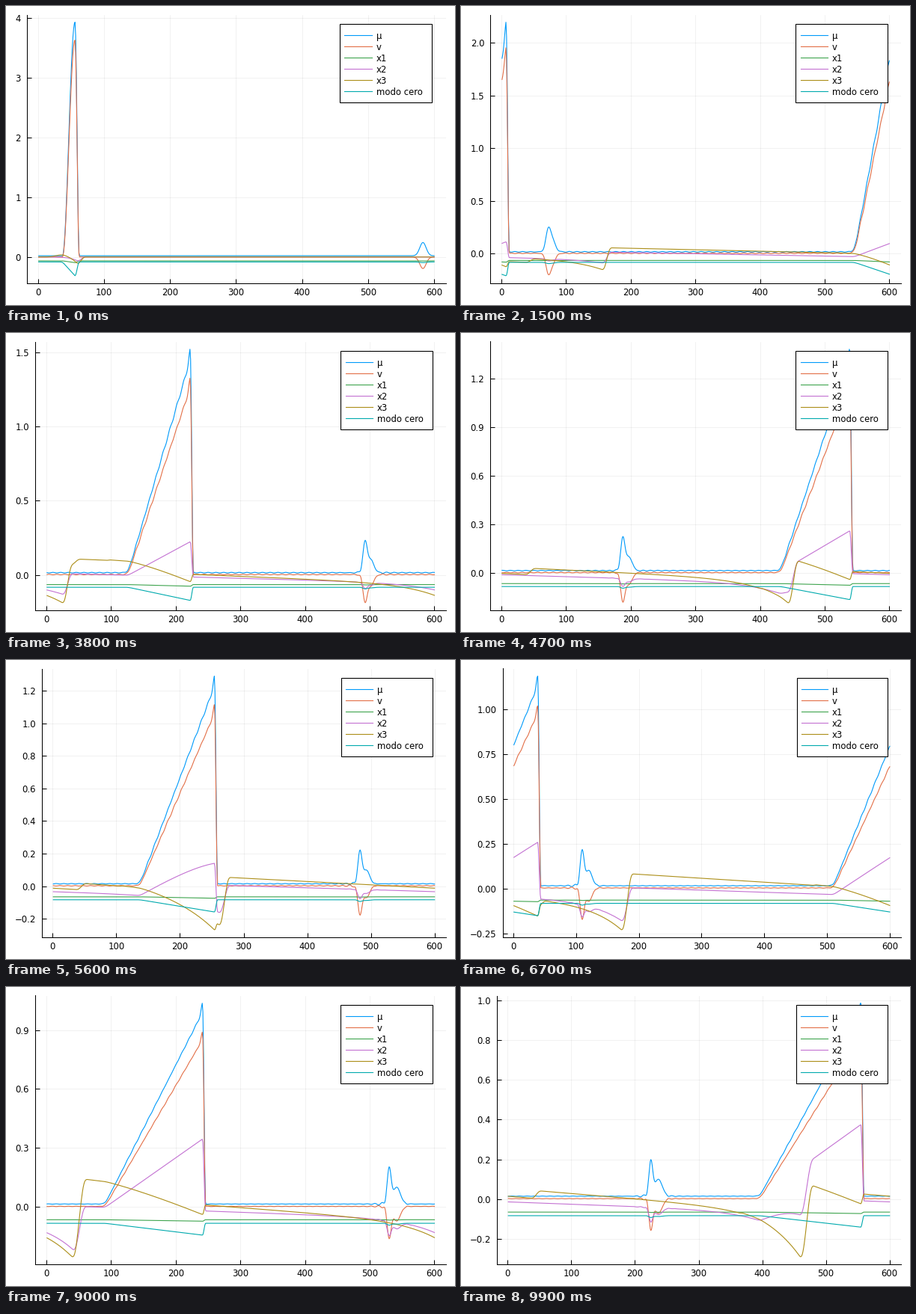
These frames come from a looping animation (600 px wide and 400 px high, 10 s). A matplotlib script:

```python
import numpy as np
import matplotlib
import matplotlib.pyplot as plt
from matplotlib.animation import FuncAnimation
from matplotlib.lines import Line2D
from matplotlib.patches import Rectangle
from matplotlib.transforms import Affine2D

W, H, N, L = 600, 400, 100, 600
TOP, BOTTOM, RIGHT = 11.5, 371, 588
FONT_PT = 11.6 * 0.72
matplotlib.rcParams["font.family"] = "DejaVu Sans"

NAMES = ["μ", "v", "x1", "x2", "x3", "modo cero"]
COLORS = ["#009afa", "#e36f47", "#3ea44e", "#c371d2", "#ac8e18", "#00aaae"]

x = np.arange(1, L + 1)


def smooth(y):
    return sum(np.roll(y, k) for k in range(-2, 3)) / 5


def ease(t):
    return (1 - np.cos(np.pi * np.clip(t, 0, 1))) / 2


def ramp(n):
    """Widening triangular pulse: full shape, plain shape, and the lag it leaves."""
    w = np.sqrt(361 + (222 + 0.29 * n) * n)
    s = (x - 37 - 33.93 * n + 30) % L - 30
    z = s - w
    young = np.exp(-n / 3)
    k = 2 - young
    line = np.minimum(k * np.log1p(np.exp(s / k)) / w, 1)
    t = np.clip(s / w, 0, 1)
    fall = 1 - ease(z / (5 + 1.5 * young))

    lead = 0.045 * (1 - young)
    rise = line + young * (ease(t) - line)
    ripple = 0.008 * np.exp(-n / 60) * (1 - young) * (1 + np.exp(z / 12))
    ripple = ripple * np.cos(2 * np.pi * z / 10.5) * np.clip(8 * t, 0, 1)
    full = (1 - lead) * rise + lead * np.exp(-((z / 3) ** 2)) + ripple
    lag = np.where(z > 0, 1 - z / (L - w), t**1.5)
    return np.where(z > 0, fall, full), line * fall, np.clip(lag, 0, 1)


def bump(n):
    """Small left-moving pulse with a growing shoulder."""
    center = 583 - 2 * (1 - np.exp(-n / 8)) - 33.9 * n
    z = (x - center + L / 2) % L - L / 2
    main = (0.222 - 0.0005 * n) * np.exp(-0.5 * (z / (3 + 1.8 * np.exp(-n / 22))) ** 2)
    shift, spread = 5 + 7 * (n / 99) ** 0.6, 4 + 2 * n / 99
    side = 0.085 * min(1, n / 10) * np.exp(-0.5 * ((z - shift) / spread) ** 2)
    outer = np.clip((-4 - z) / 3, 0, 1) + np.clip((z - 22) / 5, 0, 1)
    wave = 0.025 * min(1, n / 40) * np.cos(2 * np.pi * z / 11) * np.exp(-np.abs(z - 4) / 11)
    return main + side + wave * outer


def backgrounds(n, lag):
    """Levels of x2 and x3: a fast sharp step followed by a slow descent to a trough."""
    grown = 1 - np.exp(-n / 5)
    u = (x - 60 - 46.47 * n) % L
    jump = ease(u / (11 + 0.08 * n))
    deep = np.exp((u - L) / (10 + 42 * grown))

    def sawtooth(top, slope, trough):
        end = top - slope - trough
        fallen = top - slope * u / L - trough * deep
        return end + (fallen - end) * jump

    x2 = sawtooth(
        0.02 * np.exp(-n / 50) * grown,
        0.07 * grown,
        0.06 * np.exp(-n / 5) + 0.01 + 0.0016 * n,
    )

    size = (0.1 + 0.001 * n) * grown
    x3 = sawtooth(size / 2, size, 0.085 + 0.001 * n + 0.03 * np.exp(-n / 5))
    d = (x - 38) % L
    fixed = 0.04 * (0.5 - d / L) * ease(d / 14) - 0.02 * (1 - ease(d / 14))
    hump = 0.045 * np.exp(-n / 2) * np.exp(-(((x - 37) / 13) ** 2))
    x3 = x3 + grown * (0.033 + fixed - 0.06 * lag) + hump
    return smooth(x2), smooth(x3)


def curves(n):
    h = (0.0656 + 0.00995 * n) ** -0.5
    r, plain, lag = ramp(n)
    b = bump(n)
    x2, x3 = backgrounds(n, lag)
    start = min(1, n / 10)
    noise = 0.004 * start * np.exp(-n / 60) * np.sin(2 * np.pi * (x / 12 + 0.3 * n))
    return [
        0.015 + 0.005 * np.exp(-n / 15) + h * r + b + noise,
        0.003 * start + h * (0.868 + 0.06 * np.exp(-n / 20)) * r - 0.87 * b - noise,
        -0.065 - 0.0075 * h * plain - 0.01 * b,
        x2 + 0.0385 * np.sqrt(n) * plain - 0.4 * min(1, n / 80) * b,
        x3 - 0.05 * start * plain,
        -0.083 - 0.059 * h * plain - 0.05 * b,
    ]


def nice_ticks(lo, hi):
    """Ticks scored by count, coverage and roundness of the step."""
    best, result = -1, None
    for z in (-2, -1, 0, 1):
        for q, nice in ((1, 1), (5, 0.9), (2, 0.7), (2.5, 0.5), (3, 0.2)):
            step = q * 10.0**z
            first, last = int(np.ceil(lo / step)), int(np.floor(hi / step))
            count = last - first + 1
            if not 4 <= count <= 8:
                continue
            score = (1 - abs(count - 5) / 5) / 4 + nice / 4
            score += 0.5 * (hi - lo) / ((count - 1) * step)
            if score > best:
                digits = max(0, -z) + (q == 2.5)
                best, result = score, (np.arange(first, last + 1) * step, digits)
    ticks, digits = result
    return ticks, [f"{t:.{digits}f}".replace("-", "−") for t in ticks + 0.0]


def label_width(s):
    return sum({".": 3.8, "−": 8.6}.get(c, 7.7) for c in s)


fig = plt.figure(figsize=(W / 100, H / 100), dpi=100, facecolor="white")
ax = fig.add_axes([0.1, 0.1, 0.8, 0.8])
ax.set_xlim(1 - 0.03 * 599, 600 + 0.03 * 599)
ax.set_xticks(range(0, 601, 100))
ax.spines[["top", "right"]].set_visible(False)
for side in ("left", "bottom"):
    ax.spines[side].set_linewidth(0.75)
ax.tick_params(direction="in", length=4, width=0.75, labelsize=FONT_PT)
ax.tick_params(axis="x", pad=4.5)
ax.tick_params(axis="y", pad=5.8)
ax.set_axisbelow(True)
ax.grid(color="black", alpha=0.08, linewidth=0.5)
lines = [ax.plot(x, 0 * x, color=c, linewidth=0.8)[0] for c in COLORS]

# Legend, placed in pixels from the top left
px = Affine2D().scale(1 / W, -1 / H).translate(0, 1) + fig.transFigure
box = fig.add_artist(Rectangle((0, 23.5), 1, 105.5, transform=px, fc="white", ec="black", lw=0.8))
samples, texts = [], []
for i, (name, color) in enumerate(zip(NAMES, COLORS)):
    y = 39 + 15 * i
    samples.append(fig.add_artist(Line2D([0, 1], [y, y], transform=px, color=color, lw=0.8)))
    texts.append(fig.text(0, y + 5, name, transform=px, fontsize=FONT_PT, va="baseline"))


def place_legend(width):
    right = RIGHT - width / 30
    text_x = right - 74.2
    end = text_x - 0.0105 * width
    start = end - 0.066 * width
    left = start - 0.012 * width
    box.set_x(left)
    box.set_width(right - left)
    for sample, text in zip(samples, texts):
        sample.set_xdata([start, end])
        text.set_x(text_x)


def draw(n):
    data = curves(n)
    for line, y in zip(lines, data):
        line.set_ydata(y)
    lo, hi = np.min(data), np.max(data)
    pad = 0.03 * (hi - lo)
    ticks, labels = nice_ticks(lo - pad, hi + pad)
    ax.set_yticks(ticks, labels)
    ax.set_ylim(lo - pad, hi + pad)
    left = 20.1 + max(map(label_width, labels))
    width = RIGHT - left
    ax.set_position([left / W, 1 - BOTTOM / H, width / W, (BOTTOM - TOP) / H])
    place_legend(width)
    return lines


anim = FuncAnimation(fig, draw, frames=N, interval=100, repeat=True, repeat_delay=0, blit=False)
plt.show()
```
